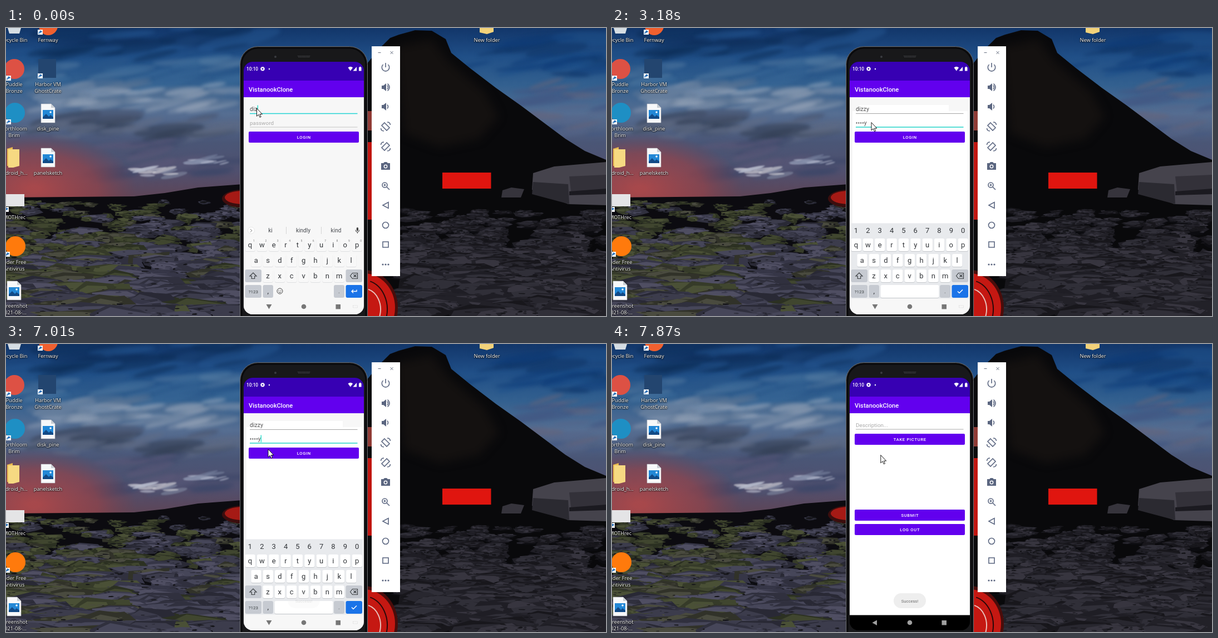
An HTML page with a canvas that plays this animation: 1078x520 px, repeating every 8000 ms.

```html
<!DOCTYPE html>
<html lang="en">
<head>
<meta charset="utf-8">
<title>Login demo</title>
<style>
html, body { margin: 0; width: 100%; height: 100%; overflow: hidden; background: #08080b; }
canvas, svg { position: absolute; left: 0; top: 0; display: block; }
text { font-family: Roboto, "Open Sans", sans-serif; white-space: pre; }
.label { font: 9.2px "Open Sans", "Noto Sans", sans-serif; fill: #fff; text-anchor: middle; text-shadow: 0 1px 2px #000, 0 0 2px #000; }
.button { font-size: 7.6px; font-weight: 500; letter-spacing: .7px; fill: #fff; text-anchor: middle; }
.key { font-size: 13px; fill: #33363a; text-anchor: middle; }
.sup { font-size: 5px; fill: #777; text-anchor: middle; }
.word { font-size: 10.1px; fill: #4a4d52; text-anchor: middle; }
.field { font-size: 10.5px; fill: #555; }
.hint { font-size: 9.9px; fill: #aaa; }
.tool { fill: none; stroke: #5b6680; stroke-width: 1.6; }
.solid { fill: #5b6680; }
</style>
</head>
<body>
<canvas id="wall" width="1078" height="520"></canvas>
<svg id="stage" width="1078" height="520" viewBox="0 0 1078 520"></svg>
<script>
const start = performance.now();
const LOOP = 8000;
const byId = id => document.getElementById(id);
const text = (cls, x, y, s, extra = '') => `<text class="${cls}" x="${x}" y="${y}" ${extra}>${s}</text>`;
const rect = (x, y, w, h, fill, r = 0) => `<rect x="${x}" y="${y}" width="${w}" height="${h}" rx="${r}" fill="${fill}"/>`;
const dot = (x, y, r, fill) => `<circle cx="${x}" cy="${y}" r="${r}" fill="${fill}"/>`;
const path = (d, attrs) => `<path d="${d}" ${attrs}/>`;
const group = (id, body) => `<g id="${id}">${body}</g>`;

// ---------- wallpaper ----------
let seed = 11;
const rnd = (a = 0, b = 1) => {
  seed = (seed * 16807) % 2147483647;
  return a + (b - a) * seed / 2147483647;
};
const pick = list => list[Math.floor(rnd(0, list.length))];
const ctx = byId('wall').getContext('2d');

function shape(fill, ...pts) {
  ctx.fillStyle = fill;
  ctx.beginPath();
  for (let i = 0; i < pts.length; i += 2) ctx.lineTo(pts[i], pts[i + 1]);
  ctx.fill();
}

function oval(x, y, rx, ry, fill, turn = 0) {
  ctx.fillStyle = fill;
  ctx.beginPath();
  ctx.ellipse(x, y, rx, ry, turn, 0, 7);
  ctx.fill();
}

function clouds(n, x, y, w, h, len, colors) {
  for (let i = 0; i < n; i++) {
    const l = rnd(.3, 1) * len;
    oval(x + rnd(0, w), y + rnd(0, h), l, l * rnd(.08, .2), pick(colors), rnd(-.3, .05));
  }
}

function blob(x, y, w, h, fill, sides = 7) {
  const pts = [];
  for (let i = 0; i < sides; i++) {
    const a = i / sides * Math.PI * 2, k = rnd(.6, 1.2);
    pts.push(x + Math.cos(a) * w * k, y + Math.sin(a) * h * k);
  }
  shape(fill, ...pts);
}

// overlapping slabs, larger towards the viewer
function rocks(n, x0, x1, y0, palette) {
  const height = 525 - y0;
  for (let i = 0; i < n; i++) {
    const y = y0 + height * i / n, x = rnd(x0 - 10, x1);
    const size = 5 + (y - y0) * .1, w = size * rnd(1.6, 4), h = size * rnd(.6, 1.1);
    const [light, mid] = palette(x, y);
    blob(x, y + h * .45, w, h, '#0c0c10');
    blob(x, y, w, h, mid);
    blob(x - 2, y - h * .3, w * .75, h * .5, light);
    for (let k = 0; k < 14; k++)
      blob(x + rnd(-.8, .8) * w, y + rnd(-.7, .7) * h, rnd(2, 8), rnd(.5, 1.8), pick([light, mid, mid, '#141418']), 5);
  }
}

function wallpaper() {
  const sky = ctx.createLinearGradient(0, 0, 0, 310);
  ['#12366a', '#204f87', '#33608f', '#566e92', '#4a5676', '#50506f', '#5f4455'].forEach((c, i) => sky.addColorStop(i / 6, c));
  ctx.fillStyle = sky;
  ctx.fillRect(0, 0, 1078, 520);
  ctx.filter = 'blur(3px)';
  clouds(24, 0, 0, 420, 50, 80, ['#0f2f5c88', '#24558f88', '#0c2b5477']);
  clouds(26, 0, 55, 420, 45, 70, ['#3b699988', '#2a578a88', '#6d8cab55']);
  clouds(34, 80, 100, 340, 45, 65, ['#8b9bb088', '#a3afc088', '#60789777']);
  clouds(26, 40, 155, 380, 42, 70, ['#364259aa', '#485570aa', '#636d8588']);
  clouds(18, 170, 205, 250, 75, 70, ['#3a466788', '#4c5473aa', '#5c587988']);
  clouds(24, 830, 10, 250, 80, 70, ['#0f3c7888', '#1f528c88', '#12386a99']);
  clouds(24, 930, 100, 150, 100, 60, ['#56668a88', '#425883aa', '#6763788a']);
  ctx.filter = 'none';
  ctx.save();
  ctx.translate(50, 290);
  ctx.scale(1, .55);
  const glow = ctx.createRadialGradient(0, 0, 10, 0, 0, 185);
  glow.addColorStop(0, '#ac484aee');
  glow.addColorStop(.6, '#964349aa');
  glow.addColorStop(1, '#80404a00');
  ctx.fillStyle = glow;
  ctx.fillRect(-60, -200, 260, 260);
  ctx.restore();
  ctx.filter = 'blur(1px)';
  clouds(13, 215, 254, 100, 14, 26, ['#b5b9c9aa', '#d3d2d8aa', '#8790a888']);
  clouds(10, 325, 232, 85, 14, 26, ['#b3b8cc99', '#7f8aa688']);
  ctx.filter = 'none';

  shape('#0c0b10', 0, 306, 230, 304, 285, 298, 345, 288, 425, 282, 425, 520, 0, 520);
  shape('#09090b', 640, 75, 670, 38, 690, 18, 706, 12, 735, 4, 765, 5, 790, 20, 800, 45, 833, 72,
    880, 108, 925, 140, 965, 170, 1005, 200, 1040, 222, 1078, 238, 1078, 520, 640, 520);
  ctx.filter = 'blur(8px)';
  shape('#141110', 700, 35, 765, 20, 795, 60, 860, 115, 885, 160, 850, 200, 780, 215, 715, 190);
  ctx.filter = 'none';

  const moss = [['#4a5036', '#363b29'], ['#40462f', '#2c3122'], ['#4a4b3f', '#313229']];
  const slate = [['#464659', '#30303e'], ['#3c3c4c', '#292935'], ['#4f4e62', '#363647']];
  const dark = [['#302f38', '#1f1e25'], ['#28272f', '#18171c'], ['#37353f', '#222128']];
  rocks(330, 0, 425, 314, (x, y) => pick(rnd() < (x < 230 ? .75 : .35) - (y - 314) * .0015 ? moss : slate));
  rocks(300, 720, 1078, 330, () => pick(dark));
  shape('#45434c', 947, 262, 985, 250, 1078, 242, 1078, 320, 1010, 318, 945, 292);
  shape('#2b2a31', 947, 278, 1010, 282, 1012, 318, 945, 300);
  shape('#333139', 1012, 268, 1078, 265, 1078, 292, 1015, 295);
  shape('#1b1a20', 1012, 295, 1078, 290, 1078, 300, 1012, 302);
  shape('#36343c', 892, 293, 908, 288, 931, 291, 925, 306, 890, 306);

  // red object behind the phone
  oval(424, 308, 36, 16, '#3c0e0e');
  oval(425, 306, 32, 12, '#a51a15');
  ctx.fillStyle = '#8f3b35';
  ctx.fillRect(648, 150, 9, 35);
  ctx.fillStyle = '#c01610';
  ctx.fillRect(648, 206, 9, 140);
  oval(643, 505, 61, 68, '#4a0d0b');
  oval(643, 505, 56, 62, '#c51812');
  for (const r of [30, 42]) {
    ctx.strokeStyle = r > 35 ? '#26090a' : '#e8c0ba';
    ctx.lineWidth = 2;
    ctx.beginPath();
    ctx.ellipse(643, 508, r, r * 1.25, 0, -1.3, 1);
    ctx.stroke();
  }
  ctx.fillStyle = '#e0150f';
  ctx.fillRect(784, 261, 87.5, 29);
}

// ---------- desktop ----------
const label = (x, y, ...lines) => lines.map((s, i) => text('label', x, y + i * 12.3, s)).join('');
const shortcut = (x, y) => rect(x, y, 9, 9, '#f4f6f8') +
  path(`M${x + 2} ${y + 7.5}q0-4 4-4m-2-1.7 3 1.7-3 2`, 'fill="none" stroke="#1766b5" stroke-width="1.3"');
const picture = (x, y) => path(`M${x} ${y}h18l7 7v27h-25z`, 'fill="#f7f8f9" stroke="#b5bac0" stroke-width=".6"') +
  path(`M${x + 18} ${y}v7h7z`, 'fill="#c9ced3"') + rect(x + 3, y + 11, 19, 16, '#2388d6') +
  path(`M${x + 3} ${y + 27}v-3l6-6 5 5 3-3 5 4v3z`, 'fill="#124a86"') + dot(x + 17, y + 15, 1.7, '#fff');

const desktop =
  path('M3 0h24l-3 10H6z', 'fill="#d5dde3"') + label(14.5, 25, 'Recycle Bin') +
  dot(76, -4, 17, '#f0602f') + shortcut(57, 3) + label(75.5, 25, 'Fernway') +
  dot(15, 74, 18, '#dd5144') + shortcut(0, 86) + label(14.5, 105, 'Puddle', 'Bronze') +
  rect(58, 56, 32, 34, '#23456f') + shortcut(57, 82) + label(75.5, 105, 'Harbor VM', 'GhostCrate') +
  dot(16, 153, 18, '#1e8fc4') + shortcut(0, 165) + label(14.5, 185, 'Northloom', 'Brim') +
  picture(63, 137) + label(75.5, 185, 'disk_pine') +
  path('M2 218l10-3v36l-10-2z', 'fill="#e9bb4f"') + path('M4 219h20v30l-11 3H4z', 'fill="#f6d982"') + label(13.5, 265, 'android_h...') +
  picture(63, 217) + label(75.5, 265, 'panelsketch') +
  rect(0, 300, 33, 22, '#e4e4e6') + shortcut(-4, 323) + label(15, 345, 'MOTHrec') +
  dot(17, 394, 18, '#ff7a0c') + shortcut(-2, 404) + label(14.5, 426, 'Alder Free', 'Antivirus') +
  picture(2, 457) + label(14.5, 505, 'Screenshot', '2021-08-...') +
  path('M851 0h25v7l-12 4-13-3z', 'fill="#f3d27a"') + label(864, 25, 'New folder');

// ---------- emulator toolbar ----------
const tool = (y, d, cls = 'tool') => path(d, `class="${cls}" transform="translate(682 ${y})"`);
const speaker = 'M-7-3h3l5-4v14l-5-4h-3z';
const toolbar = rect(657, 33, 51, 415, '#fff') +
  path('M668.5 44.5h5M690.5 42l5 5m0-5-5 5', 'fill="none" stroke="#666f80"') +
  tool(71, 'M-4.3-5a6.7 6.7 0 1 0 8.6 0M0-8v8') +
  tool(107, speaker, 'solid') + tool(107, 'M3-3.5q3 3.5 0 7M3.5-6.5q7 6.5 0 13') +
  tool(142, speaker, 'solid') + tool(142, 'M3-3.5q3 3.5 0 7') +
  tool(178, 'M-2-7 7 2 2 7-7-2zM3-8q5 0 5.5 5M-3 8q-5 0-5.5-5') +
  tool(214, 'M2-7-7 2-2 7 7-2zM-3-8q-5 0-5.5 5M3 8q5 0 5.500-5') +
  tool(249, 'M-8-5h4l2-2h4l2 2h4v12H-8z', 'solid') + dot(682, 250, 3.4, '#fff') + dot(682, 250, 2, '#5b6680') +
  tool(285, 'M2 2l5 5M-6-1.5a4.5 4.5 0 1 0 9 0a4.5 4.5 0 1 0-9 0M-3.5-1.5h4M-1.5-3.5v4') +
  tool(320, 'M5-5.5v11L-5 0z') +
  tool(356, 'M-5.5 0a5.5 5.5 0 1 0 11 0a5.5 5.5 0 1 0-11 0') +
  tool(391, 'M-5-5H5V5H-5z') +
  [677, 682, 687].map(x => dot(x, 427, 1.6, '#5b6680')).join('');

// ---------- phone ----------
const button = (y, s, id = '') => `<rect id="${id}" x="436" y="${y}" width="198" height="20" rx="2" fill="#6200ee"/>` +
  text('button', 535.3, y + 12.8, s);
const bars = rect(427, 61, 216, 34, '#3700b3') + rect(427, 95, 216, 30, '#6200ee') +
  text('', 436, 114.5, 'VistanookClone', 'font-size="11.2" font-weight="500" fill="#fff"');

const phone = '<rect x="420.5" y="33.5" width="229" height="530" rx="32" fill="#141416" stroke="#6a6c70"/>' +
  '<rect x="423.5" y="36.5" width="223" height="530" rx="29" fill="#18181a" stroke="#08080a" stroke-width="2"/>' +
  dot(484, 52, 2, '#3a3b40') +
  path('M524 50.5h23M525 52.5h21', 'stroke="#4a4b4f" stroke-dasharray="1.5 .8"');

const statusIcons = text('', 432, 77, '10:10', 'font-size="8.3" font-weight="500" fill="#fff"') +
  '<circle cx="461" cy="73.8" r="2.3" fill="none" stroke="#fff" stroke-width="1.8"/>' +
  '<circle cx="461" cy="73.8" r="3.4" fill="none" stroke="#fff" stroke-width="1.2" stroke-dasharray="1.5 1.17"/>' +
  dot(473, 74, 1.2, '#fff') +
  path('M614.5 71.5q4.3-3.4 8.6 0l-4.3 6zM630 70v7.5h-6.5zM634 71h1.3v-1.2h2v1.2h1.2v6.5H634z', 'fill="#fff"');

const rows = [['qwertyuiop', 438.5, 395.5], ['asdfghjkl', 449.3, 423.5], ['zxcvbnm', 470.5, 451.5]];
const keys = tile => rows.map(([letters, x, y]) => [...letters].map((c, i) => {
  const cx = x + i * 21.35;
  return rect(cx - 9, y - 14.5, 18.3, 23, tile ? '#c5c8cc' : '#dedfe1', 3) +
    rect(cx - 9, y - 15.5, 18.3, 23, tile ? '#fff' : '#f8f8f8', 3) + text('key', cx, y, c);
}).join('')).join('');
const digits = (cls, x, y) => [...'1234567890'].map((c, i) => text(cls, x + i * 21.35, y, c)).join('');
const greyKey = (x, y, w) => rect(x, y, w, 23, '#c6cad1', 3);
const controls = greyKey(429.5, 436, 29.5) + greyKey(610.5, 436, 29.5) + greyKey(429.5, 464, 29.5) +
  greyKey(461.5, 464, 18.5) + greyKey(589, 464, 19) + rect(610.5, 464, 29.5, 23, '#1a73e8', 3) +
  path('M444 442l6 6h-3.3v4.5h-5.4V448H438zM618.5 447.5l4-5h9v10h-9zM624.5 445l5 5m0-5-5 5', 'fill="none" stroke="#3c4043" stroke-width="1.2"') +
  text('', 444.3, 478.5, '?123', 'font-size="8" fill="#3c4043" text-anchor="middle"') +
  text('key', 470.7, 478.5, ',') + text('key', 598.5, 478.5, '.', 'opacity=".5"');

const kbWords = keys(false) + controls + digits('sup', 445.5, 386) +
  '<circle cx="440.5" cy="365.5" r="6" fill="#fff" stroke="#e6e6e6"/>' +
  path('M439 363l2.8 2.8-2.8 2.8', 'fill="none" stroke="#777"') +
  path('M503.5 359v13M566.5 359v13', 'stroke="#d5d5d5"') +
  rect(629.8, 360, 3.2, 6.5, '#444', 1.6) + path('M628 364.5q0 4 3.4 4t3.4-4M631.4 368.5v2.5', 'fill="none" stroke="#444"') +
  [475, 534, 593].map((x, i) => text('word', x, 369, '', `id="word${i}"`)).join('') +
  '<circle cx="492" cy="475" r="5" fill="none" stroke="#444"/>' + dot(490.2, 473.7, .8, '#444') + dot(493.8, 473.7, .8, '#444') +
  path('M489.5 476.3q2.5 2.8 5 0', 'fill="none" stroke="#444"') +
  path('M621 475.5h9v-3M624 472.5l-3 3 3 3', 'fill="none" stroke="#fff" stroke-width="1.3"');

const kbDigits = rect(430, 352.5, 211, 136, '#e8eaed') + keys(true) + controls + digits('key', 438.5, 370.3) +
  rect(482.5, 465, 105, 23, '#c5c8cc', 3) + rect(482.5, 464, 105, 23, '#fff', 3) +
  path('M621 475.5l3 3 6-6', 'fill="none" stroke="#fff" stroke-width="1.5"');

const login = rect(427, 125, 216, 392, '#f7f7f7') +
  group('patch', rect(445, 139, 160, 232, '#fff')) + group('panel', rect(432, 150, 207, 203, '#fff')) + bars +
  path('M438 154.5h193.5', 'id="line1"') + path('M438 179h193.5', 'id="line2"') +
  text('field', 438, 150.3, '', 'id="user"') + text('hint', 438, 174.8, 'password', 'id="hint"') +
  group('dots', '') + text('field', 0, 174.8, '', 'id="letter"') +
  '<rect id="caret" width="1.2" height="13" fill="#03dac5"/>' + button(187, 'LOGIN', 'loginButton');

const feed = rect(427, 125, 216, 365, '#fff') + bars + text('hint', 438, 150.3, 'Description...') +
  path('M438 154h193.5', 'stroke="#aaa"') + button(162, 'TAKE PICTURE') + button(299, 'SUBMIT') + button(325, 'LOG OUT');

const navBar = '<rect id="navFill" x="427" y="489.5" width="216" height="28"/>' +
  group('navIcons', '<path id="back"/>' + '<circle cx="535" cy="503" r="4.3"/><rect x="592.5" y="499" width="8.5" height="8.5"/>') +
  path('M623.5 501h8v4h-8z', 'id="switcher" fill="none" stroke="#ddd" stroke-dasharray="1.5 1"');
const toast = rect(506, 450, 58, 27, '#eee', 13.5) + text('', 535, 466.5, 'Success!', 'font-size="7.6" fill="#6b6b6b" text-anchor="middle"');

wallpaper();
byId('stage').innerHTML =
  '<clipPath id="glass"><rect x="427" y="61" width="216" height="456" rx="16"/></clipPath>' +
  desktop + toolbar + phone +
  `<g clip-path="url(#glass)">${rect(427, 61, 216, 456, '#000')}` +
  group('login', login) + group('feed', feed) + group('kbWords', kbWords) + group('kbDigits', kbDigits) +
  group('navBar', navBar) + statusIcons + group('toast', toast) + '</g>' +
  group('mouse', path('M0 0v14.3l3.3-3 2.2 5 2.2-1-2.2-4.7h4.4z', 'fill="#fff" stroke="#000" stroke-width=".9"'));

// ---------- timeline: [start, value] ----------
const SECOND = 1140, LEAVE = 7160, ARRIVE = 7310;
const track = {
  mouse: [[0, [450.5, 145]], [710, [457.5, 156.5]], [860, [466, 170.5]], [6140, [469, 182]], [6290, [471, 190]], [7870, [482.8, 200.5]]],
  user: [[0, 'diz'], [130, 'dizzy']],
  words: [[0, 'ki kindly kind'], [130, 'diz dizzy dim'], [430, 'dizzy dizzily dizz']],
  pass: [[0, ''], [1570, 'd'], [1720, '•'], [1870, '•i'], [2300, '••z'], [2600, '•••z'], [2730, '••••y'],
    [3770, '••••'], [3920, '•••'], [4080, '••'], [4230, '•'], [4380, ''],
    [4970, 'd'], [5100, '•i'], [5400, '••z'], [5550, '••••y']],
  caret: [[0, 1], [710, 0], [SECOND, 1], [3180, 0], [3770, 1], [6140, 0], [6680, 1]],
  press: [[0, '#6200ee'], [6550, '#7a2cf1'], [6680, '#6c12ef'], [6840, '#6200ee']],
  leave: [[0, 1], [LEAVE, 1.0155]],
  enter: [[0, [1, 0]], [LEAVE, [.87, .15]], [ARRIVE, [.993, 1]], [7460, [.998, 1]], [7590, [1, 1]]],
  toast: [[0, 0], [7010, .18], [LEAVE, .7], [ARRIVE, 1]]
};
const at = (name, t) => track[name].reduce((v, step) => step[0] <= t ? step[1] : v, null);
const show = (id, on) => byId(id).setAttribute('display', on ? 'inline' : 'none');
const set = (id, attrs) => { for (const k in attrs) byId(id).setAttribute(k, attrs[k]); };
const zoom = s => `translate(535 289) scale(${s}) translate(-535 -289)`;
const PITCH = 3.8;

function drawFields(t, second) {
  const pass = at('pass', t), count = pass.split('•').length - 1;
  const letterX = 437.5 + count * PITCH;
  byId('user').textContent = at('user', t);
  byId('letter').textContent = pass.slice(count);
  byId('dots').innerHTML = [...Array(count).keys()].map(i => dot(439.6 + i * PITCH, 171.5, 1.15, '#555')).join('');
  set('letter', { x: letterX });
  show('hint', !pass);
  const [x, id] = second ? [letterX, 'letter'] : [438, 'user'];
  set('caret', { x: x + byId(id).getComputedTextLength(), y: second ? 164.5 : 139.5 });
  show('caret', at('caret', t));
  set('line1', { stroke: second ? '#a5a5a5' : '#22d3d3', 'stroke-width': second ? 1 : 1.5 });
  set('line2', { stroke: second ? '#22d3c8' : '#c5c5c5', 'stroke-width': second ? 1.5 : 1 });
}

function draw(t) {
  const second = t >= SECOND, left = t >= LEAVE, arrived = t >= ARRIVE;
  const [scale, opacity] = at('enter', t);
  drawFields(t, second);
  at('words', t).split(' ').forEach((w, i) => byId('word' + i).textContent = w);
  show('patch', t >= 130);
  show('panel', second);
  show('kbWords', !second);
  show('kbDigits', second && !arrived);
  show('login', !arrived);
  set('loginButton', { fill: at('press', t) });
  set('login', { transform: zoom(at('leave', t)) });
  set('feed', { transform: zoom(scale), opacity });
  set('navFill', { fill: left ? '#000' : '#f7f7f7' });
  set('navIcons', { fill: left ? '#a0a0a0' : '#777' });
  set('back', { d: arrived ? 'M476 498.5v9.5l-8.5-4.7z' : 'M467.5 499h10l-5 8.5z' });
  show('switcher', !left);
  set('toast', { opacity: at('toast', t) });
  set('mouse', { transform: `translate(${at('mouse', t)})` });
}

const cuts = [...new Set(Object.values(track).flat().map(s => s[0]))].sort((a, b) => a - b);
let shown = -1;
function tick() {
  const t = (performance.now() - start) % LOOP;
  const cut = cuts.filter(c => c <= t).pop();
  if (cut !== shown) draw(shown = cut);
  requestAnimationFrame(tick);
}
tick();
</script>
</body>
</html>
```
